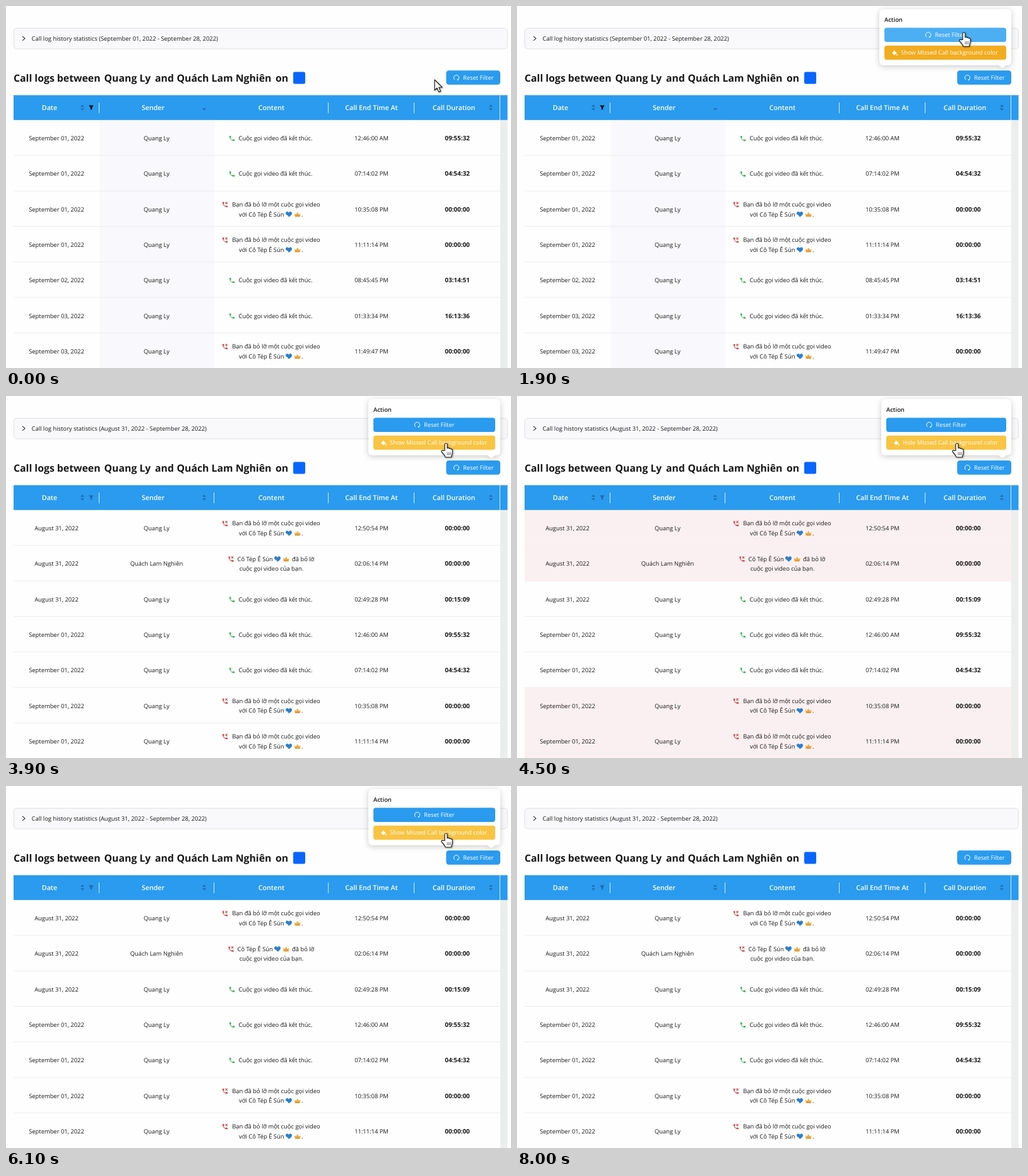
An HTML page that plays this animation: 800 px wide and 574 px high, repeating every 8100 ms.

```html
<!DOCTYPE html>
<html lang="en">
<head>
<meta charset="utf-8">
<title>Call logs</title>
<style>
html, body { margin: 0; width: 100%; height: 100%; overflow: hidden; background: #fefefe; }
svg { display: block; width: 800px; height: 574px; }
text {
  font: 9.4px "Open Sans", "Noto Sans", sans-serif;
  fill: #181818; white-space: pre; text-rendering: geometricPrecision;
}
.mid { text-anchor: middle; }
.white { fill: #fff; }
.semi { font-weight: 600; }
.dur { font-weight: 700; font-size: 9.9px; text-anchor: middle; }
.head { font-weight: 600; font-size: 10.7px; fill: #fff; text-anchor: middle; }
.title { font-weight: 700; font-size: 15.8px; }
.pop { filter: drop-shadow(0 2px 5px #0003); }
.cursor { filter: drop-shadow(1.5px 1.5px 1px #0006); }
</style>
</head>
<body>
<svg id="stage" viewBox="0 0 800 574"></svg>
<script>
const LOOP = 8100, STEP = 100, ROW_H = 56.3, TOP = 181, RIGHT = 794.5;
const BLUE = [42, 155, 238], BLUE_HOT = [90, 182, 245];
const GOLD = [242, 172, 31], GOLD_HOT = [248, 196, 66];
const CALLER = 'Quang Ly', FRIEND = 'Quách Lam Nghiên', NICK = 'Cô Tép Ê Sún';
const FILTER_RESET = 2200, TOGGLES = [4000, 4800, 5300, 5800];

// date, kind (ok = ended, me / them = who missed it), end time, duration
const CALLS = [
  ['August 31, 2022', 'me', '12:50:54 PM'],
  ['August 31, 2022', 'them', '02:06:14 PM'],
  ['August 31, 2022', 'ok', '02:49:28 PM', '00:15:09'],
  ['September 01, 2022', 'ok', '12:46:00 AM', '09:55:32'],
  ['September 01, 2022', 'ok', '07:14:02 PM', '04:54:32'],
  ['September 01, 2022', 'me', '10:35:08 PM'],
  ['September 01, 2022', 'me', '11:11:14 PM'],
  ['September 02, 2022', 'ok', '08:45:45 PM', '03:14:51'],
  ['September 03, 2022', 'ok', '01:33:34 PM', '16:13:36'],
  ['September 03, 2022', 'me', '11:49:47 PM']
];

// time, x, y of the pointer tip
const PATH = [
  [0, 679, 117], [200, 682, 117], [500, 725, 117], [1000, 725, 117], [1600, 708, 42],
  [2400, 708, 42], [2900, 700, 67], [3000, 700, 67], [3400, 697, 75], [6300, 697, 75], [6500, 770, 88]
];

const clamp = v => Math.max(0, Math.min(1, v));
const ease = v => v * v * (3 - 2 * v);
const mix = (a, b, k) => `rgb(${a.map((v, i) => Math.round(v + (b[i] - v) * k))})`;
const text = (x, y, s, cls = '') => `<text x="${x}" y="${y}" class="${cls}">${s}</text>`;
const rect = (x, y, w, h, fill, extra = '') =>
  `<rect x="${x}" y="${y}" width="${w}" height="${h}" fill="${fill}" ${extra}/>`;
const path = (d, fill, extra = '') => `<path d="${d}" fill="${fill}" ${extra}/>`;
const at = (x, y, body, scale = 1) => `<g transform="translate(${x} ${y}) scale(${scale})">${body}</g>`;

const HANDSET = 'M6.6 10.8c1.4 2.8 3.8 5.1 6.6 6.6l2.2-2.2c.3-.3.7-.4 1-.2 1.1.4 2.3.6 3.6.6.6 0 1 .4 1 1V20' +
  'c0 .6-.4 1-1 1C10.6 21 3 13.4 3 4c0-.6.4-1 1-1h3.5c.6 0 1 .4 1 1 0 1.2.2 2.5.6 3.6.1.3 0 .7-.2 1z';

function phone(x, y, missed) {
  const color = missed ? '#d0484f' : '#35b254';
  const cross = missed ? path('M13 3l7 7M20 3l-7 7', 'none', `stroke="${color}" stroke-width="2.4"`) : '';
  return at(x - 5.5, y - 5.5, path(HANDSET, color) + cross, 0.46);
}

const emojis = (x, y) =>
  at(x, y, path('M0 4.5C-2-.1-5 1.5-5-1.5C-5-4.6-1.2-5 0-2.4C1.2-5 5-4.6 5-1.5C5 1.5 2 2.5 0 4.5z', '#2c7fcf')) +
  at(x + 13.7, y, path('M-4 4L-5-1.5L-2.4.2L0-3.5L2.4.2L5-1.5L4 4z', '#efae45') +
    path('M-3.5 2.6H3.5', 'none', 'stroke="#c67a2c" stroke-width=".8"'));

const reload = (x, y) => at(x, y,
  path('M-2.6 3.2A4.1 4.1 0 1 1 2 3.6', 'none', 'stroke="#fff" stroke-width="1"') +
  path('M1.1 2.2L3.9 2.9L1.6 4.8z', '#fff'));

const bucket = (x, y) => at(x, y,
  path('M-1.5-4L3.2.4L-.6 4L-4.4.4L-1.6-2.2z', '#fff') + path('M3.6 1.6q2 3 0 3q-2 0 0-3z', '#fff'));

const carets = (x, upper) =>
  (upper ? path(`M${x - 3} 159.8h6l-3-3.4z`, '#2269a8') : '') +
  path(`M${x - 3} 162.2h6l-3 3.4z`, '#2269a8');

function content(kind, y) {
  if (kind === 'ok') return phone(358, y + .4) + text(368.5, y + 3.5, 'Cuộc gọi video đã kết thúc.');
  if (kind === 'me') return phone(347, y - 7.3, true) +
    text(428, y - 4.3, 'Bạn đã bỏ lỡ một cuộc gọi video', 'mid') +
    text(369, y + 11.3, 'với ' + NICK) + emojis(448, y + 8) + text(468, y + 11.3, '.');
  return phone(356.5, y - 7.3, true) + text(366.5, y - 4.3, NICK) + emojis(430, y - 7.5) +
    text(453, y - 4.3, 'đã bỏ lỡ') + text(420.5, y + 11.3, 'cuộc gọi video của bạn.', 'mid');
}

function row([date, kind, end, duration = '00:00:00'], i, pink) {
  const y = TOP + i * ROW_H, c = y + 28.6, base = c + 3.5;
  return (kind !== 'ok' && pink ? rect(12, y, 771, ROW_H, '#fbf0f1', `opacity="${pink}"`) : '') +
    rect(12, y + ROW_H - .9, 771, 1, '#ededef') +
    text(80, base, date, 'mid') +
    text(238.5, base, kind === 'them' ? FRIEND : CALLER, 'mid') +
    content(kind, c) +
    text(579, base, end, 'mid') + text(715, base, duration, 'dur');
}

function header(filtered) {
  const names = [[69, 'Date'], [233, 'Sender'], [420.5, 'Content'], [579, 'Call End Time At'], [709.5, 'Call Duration']];
  const lines = filtered ? [147, 510, 646] : [147, 329, 510, 646];
  return rect(12, 141.4, RIGHT - 12, TOP - 141.6, mix(BLUE, BLUE, 0)) +
    names.map(([x, s]) => text(x, 165, s, 'head')).join('') +
    lines.map(x => rect(x + .2, 153, .8, 17, '#fff')).join('') +
    rect(782.2, 141.4, .8, TOP - 141.6, '#fff') +
    carets(121, true) + carets(314, !filtered) + carets(768, true) +
    path('M131.2 157.5h7.6l-2.6 3.8v3h-2.4v-3z', filtered ? '#111' : '#2269a8');
}

function popover(show, hide, hotReset, hotGold) {
  if (!show) return '';
  const d = hide ? 3 : 0, k = .8 + .2 * show;
  return `<g opacity="${show}" transform="translate(769 98) scale(${k}) translate(-769 -98)">` +
    `<g class="pop">${rect(574 + d, 5, 209 - d, 89, '#fff', 'rx="6"')}${path('M763 94h12l-6 4.5z', '#fff')}</g>` +
    text(582 + d, 24.5, 'Action', 'semi') +
    rect(582 + d, 34.5, 193 - d, 22.5, mix(BLUE, BLUE_HOT, hotReset), 'rx="4"') +
    reload(651.5 + d / 2, 45.7) + text(662 + d / 2, 49.2, 'Reset Filter', 'white') +
    rect(582 + d, 62.7, 193 - d, 22.5, mix(GOLD, GOLD_HOT, hotGold), 'rx="4"') +
    bucket(598.5 + d, 74) +
    text(608 + d, 77.4, (hide ? 'Hide' : 'Show') + ' Missed Call background color', 'white') + '</g>';
}

function pointer(t) {
  const i = PATH.findIndex(p => p[0] > t);
  if (i < 0) return null;
  const [t0, x0, y0] = PATH[i - 1], [t1, x1, y1] = PATH[i];
  const k = ease((t - t0) / (t1 - t0));
  return { x: x0 + (x1 - x0) * k, y: y0 + (y1 - y0) * k };
}

const ARROW = 'M0 0V16.5L3.9 13L6.6 19.3L9.4 18.1L6.7 12H12z';
const HAND = 'M-2 11.5V2a2 2 0 0 1 4 0V8a1.7 1.7 0 0 1 3.2.5a1.6 1.6 0 0 1 2.8.8a1.4 1.4 0 0 1 2.2 1.2V15' +
  'c0 3-1.6 4-1.8 7H-1c-.4-3-3.4-5-5.8-8.4c-1.2-2 .8-3.2 2.3-1.9z';

function cursor(p, hand) {
  return p ? `<g class="cursor">${at(p.x, p.y,
    path(hand ? HAND : ARROW, '#fff', 'stroke="#222" stroke-width="1.2" stroke-linejoin="round"') +
    (hand ? path('M2.2 14v5M4.6 14v5M7 14v5', 'none', 'stroke="#222" stroke-width=".7"') : ''))}</g>` : '';
}

// 0..1 while t lies between two times, fading over 200 ms on both ends
const during = (t, from, to) => Math.min(clamp((t - from) / 200), clamp(1 - (t - to) / 200));

function scene(t) {
  const filtered = t < FILTER_RESET;
  const past = TOGGLES.filter(v => v <= t), hide = past.length % 2 === 1;
  const fade = past.length ? clamp((t - past[past.length - 1] + 100) / 300) : 1;
  const pink = hide ? fade : 1 - fade;
  const first = filtered ? 'September 01' : 'August 31';
  const calls = filtered ? CALLS.slice(3) : CALLS.slice(0, 7);
  const hotGold = t < 3400 ? .4 * during(t, 2800, 9000) : during(t, 3200, 6400);
  const title = [[12, 'Call logs between'], [155.5, CALLER], [236, 'and'], [270.5, FRIEND], [427, 'on']];
  return rect(0, 0, 800, 574, '#fefefe') +
    rect(12.3, 35.3, RIGHT - 12.6, 32.7, '#f9f9fb', 'rx="5" stroke="#d9d9db" stroke-width=".8"') +
    path('M26 48l4 3.4l-4 3.4', 'none', 'stroke="#333" stroke-width="1.1"') +
    text(40.5, 54.8, `Call log history statistics (${first}, 2022 - September 28, 2022)`) +
    title.map(([x, s]) => text(x, 120.3, s, 'title')).join('') +
    rect(455, 104.5, 19, 19, '#0866ff', 'rx="2.5"') +
    rect(697.3, 102.2, 85.7, 22.5, mix(BLUE, BLUE_HOT, during(t, 300, 1100)), 'rx="4.2"') +
    reload(713.5, 113.7) + text(724, 117, 'Reset Filter', 'white') +
    header(filtered) +
    (filtered ? rect(148, TOP, 182, 393, '#f9f8fc') : '') +
    calls.map((c, i) => row(c, i, pink)).join('') +
    rect(783, TOP, RIGHT - 783, 393, '#ebeeed') +
    popover(during(t, 400, 6600), hide, .7 * during(t, 1400, 2500), hotGold) +
    cursor(pointer(t), t >= 400);
}

const stage = document.getElementById('stage'), start = performance.now();
let shown = -1;
function tick(now) {
  const t = Math.floor(Math.max(0, now - start) % LOOP / STEP) * STEP;
  if (t !== shown) stage.innerHTML = scene(shown = t);
  requestAnimationFrame(tick);
}
tick(start);
</script>
</body>
</html>
```
